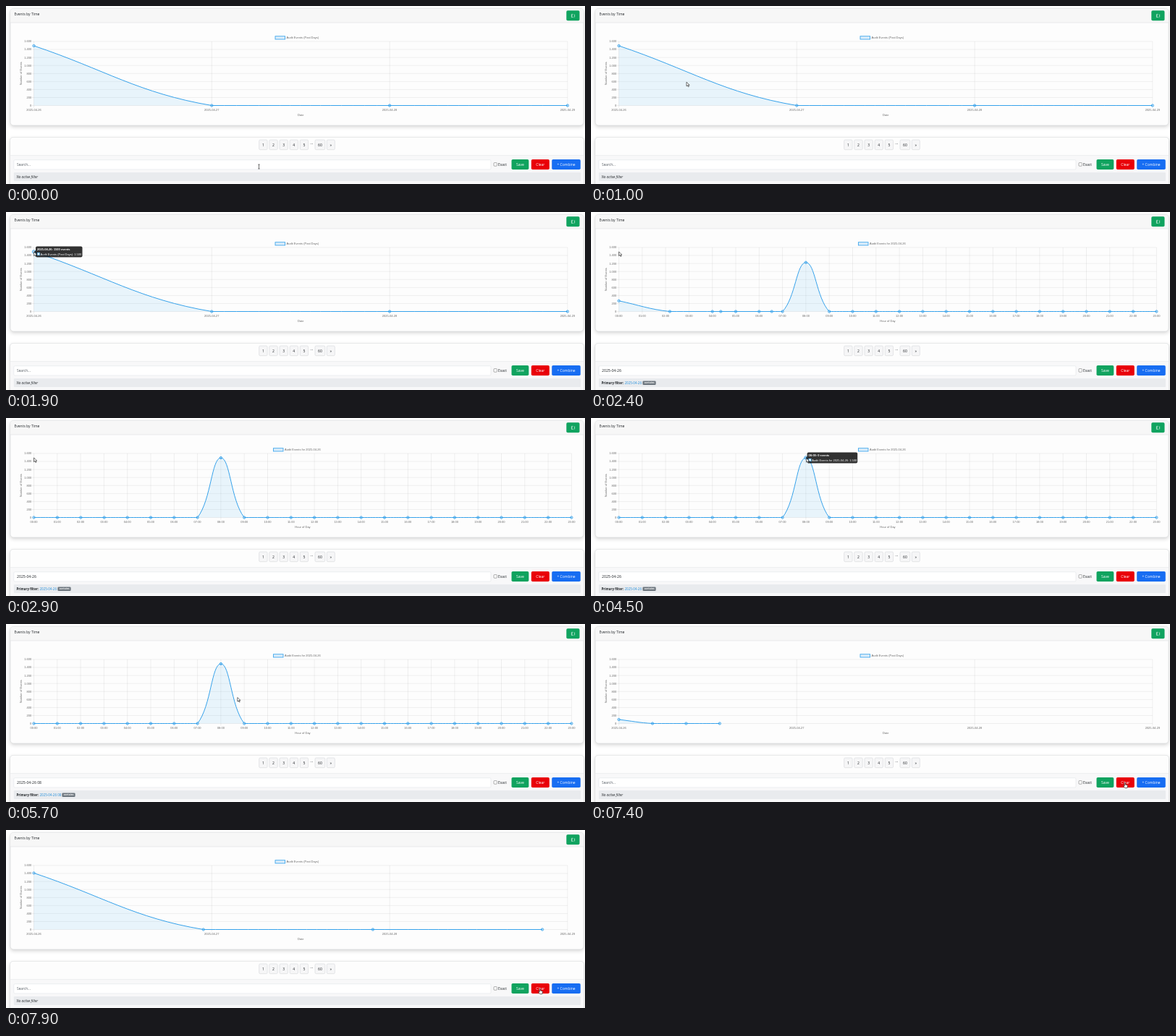
Write an HTML page that moves like this. It is 800x246 px and loops after 8000 ms.

```html
<!DOCTYPE html>
<html lang="en">
<head>
<meta charset="utf-8">
<title>Events by Time</title>
<style>
  html, body { margin: 0; width: 100%; height: 100%; overflow: hidden; background: #fff; }
  svg { display: block; width: 800px; height: 246px; }
  text { font: 5px "Open Sans", "Noto Sans", sans-serif; fill: #212529; white-space: pre; }
  .chart text { font: 4px "Liberation Sans", Arial, sans-serif; fill: #666; }
  .chart .tip text { fill: #fff; }
  .chart .tip .title { font-weight: bold; }
  .mid { text-anchor: middle; }
  .end { text-anchor: end; }
  .white { fill: #fff; }
  .card { fill: #fdfdfd; stroke: #d6d7d8; stroke-width: .6; filter: drop-shadow(0 2px 2.5px rgba(0, 0, 0, .16)); }
  .grid { stroke: rgba(0, 0, 0, .11); stroke-width: .55; fill: none; }
  .line { fill: none; stroke: #36a2eb; stroke-width: 1; stroke-linejoin: round; }
  .area { fill: rgba(54, 162, 235, .1); }
  .dot, .key { fill: rgba(54, 162, 235, .16); stroke: #36a2eb; stroke-width: .85; }
  .page { fill: #f6f6f7; stroke: #d5d7da; stroke-width: .6; }
  .cursor { fill: #fff; stroke: #111; stroke-width: .6; stroke-linejoin: round; }
</style>
</head>
<body>
<svg viewBox="0 0 800 246">
  <rect class="card" x="6" y="3.5" width="792" height="161.5" rx="4.5"/>
  <path d="M6.3 22.8V8a4.2 4.2 0 0 1 4.2-4.2h783a4.2 4.2 0 0 1 4.2 4.2v14.8z" fill="#f7f7f7"/>
  <path d="M6 23h792" stroke="#dcdddf" stroke-width=".6"/>
  <text x="11.5" y="13">Events by Time</text>
  <rect x="774.3" y="6.3" width="18.2" height="14" rx="1.8" fill="#10a35f"/>
  <path d="M783.6 11.5h-2.2v4h2.2M781.4 13.5h1.5M785.6 11.5v3.2q0 .8-.9.8" fill="none" stroke="#fff" stroke-width=".6"/>

  <g class="chart">
    <g id="yAxis"></g>
    <g id="dayAxis"></g>
    <g id="hourAxis"></g>
    <path id="area" class="area"/>
    <path id="line" class="line"/>
    <g id="dots"></g>
    <g id="dayTip" class="tip"></g>
    <g id="hourTip" class="tip"></g>
  </g>

  <rect class="card" x="5.5" y="181.3" width="793" height="80" rx="4.5"/>
  <rect x="5.8" y="206.5" width="792.4" height="40" fill="#f8f8f9"/>
  <path d="M5.8 206.5h792.4" stroke="#e6e7e9" stroke-width=".6"/>
  <g id="pages"></g>

  <rect x="10.8" y="212.7" width="659.2" height="13.2" rx="1.6" fill="#fff" stroke="#e1e4e7" stroke-width=".6"/>
  <text id="query" x="15" y="221.2"></text>
  <rect x="674" y="216.6" width="4.4" height="4.6" rx=".8" fill="#fff" stroke="#777" stroke-width=".6"/>
  <text x="680" y="221.1" style="font-size:4.85px">Exact</text>
  <g id="actions"></g>

  <rect x="10.8" y="230" width="783.2" height="12" rx="1.2" fill="#e9ebee"/>
  <text id="empty" x="14.5" y="237.6" style="font-size:4.65px;font-style:italic">No active filter</text>
  <g id="filter">
    <text x="14.5" y="237.6" style="font-size:4.35px;font-weight:bold">Primary filter:</text>
    <text id="term" x="46.5" y="237.6" style="font-size:4.5px;fill:#2490dd"></text>
    <g id="badge">
      <rect x="0" y="233.4" width="18.2" height="5.6" rx="1.3" fill="#6c757d"/>
      <text class="mid white" x="9.1" y="237.3" style="font-size:3.3px;font-weight:bold">contains</text>
    </g>
  </g>

  <g id="cursor" class="cursor">
    <path id="arrow" d="M0 0v5.6l1.4-1.2 1 2.1 1-.45-1-2h1.8z"/>
    <path id="beam" d="M-1.1-3h2.2M0-3v6M-1.1 3h2.2"/>
    <path id="hand" d="M-.6.4q.6-.7 1.2 0v2.3l2.3.6q.8.3.7 1.2l-.5 2.8h-3.2l-2-2.6q-.2-.9.7-.8l.8.6z"/>
  </g>
</svg>
<script>
const LOOP = 8000, STEP = 100;
const LEFT = 38.5, TOP = 49, BASE = 137.5, PEAK = 55;
const DAY_GAP = 245.8, HOUR_GAP = 32.3;
const DRILL = 2050, PICK = 5000, CLEAR = 7383;
const $ = id => document.getElementById(id);

function add(parent, tag, attrs, content) {
  const el = document.createElementNS("http://www.w3.org/2000/svg", tag);
  for (const k in attrs) el.setAttribute(k, attrs[k]);
  if (content) el.textContent = content;
  parent.appendChild(el);
  return el;
}
const label = (g, x, y, s, cls = "mid") => add(g, "text", { x, y, class: cls }, s);

function buildAxis(g, names, gap, title, legend, keyX) {
  const right = LEFT + gap * (names.length - 1);
  names.forEach((name, i) => {
    const x = LEFT + gap * i;
    add(g, "path", { class: "grid", d: `M${x} ${TOP}V${BASE + 3}` });
    label(g, x, 144.8, name);
  });
  for (let i = 0; i <= 8; i++)
    add(g, "path", { class: "grid", d: `M${LEFT - 3} ${BASE - i * (BASE - TOP) / 8}H${right}` });
  label(g, (LEFT + right) / 2, 152, title);
  add(g, "rect", { class: "key", x: keyX, y: 41.8, width: 13.6, height: 4.2 });
  label(g, keyX + 15.6, 45.3, legend, "");
}

function buildTip(g, x, width, title, body) {
  add(g, "path", { d: `M${x - 2} 55l2-2v4z`, fill: "rgba(0,0,0,.8)" });
  add(g, "rect", { x, y: 47.4, width, height: 15, rx: 2, fill: "rgba(0,0,0,.8)" });
  label(g, x + 2, 52.8, title, "title");
  add(g, "rect", { x: x + 2.2, y: 56.2, width: 3.4, height: 3.6, fill: "#e6f3fc", stroke: "#36a2eb", "stroke-width": .6 });
  label(g, x + 6.6, 59.5, body, "");
}

function buildStatic() {
  for (let i = 0; i <= 8; i++) {
    const n = i * 200;
    const s = n < 1000 ? `${n}` : `1.${String(n - 1000).padStart(3, "0")}`;
    label($("yAxis"), 35.3, BASE - i * (BASE - TOP) / 8 + 1.4, s, "end");
  }
  add($("yAxis"), "text", { class: "mid", transform: "translate(22 93.3) rotate(-90)" }, "Number of Events");

  const days = [26, 27, 28, 29].map(d => `2025-04-${d}`);
  const hours = Array.from({ length: 24 }, (_, h) => String(h).padStart(2, "0") + ":00");
  buildAxis($("dayAxis"), days, DAY_GAP, "Date", "Audit Events (Past Days)", 372);
  buildAxis($("hourAxis"), hours, HOUR_GAP, "Hour of Day", "Audit Events for 2025-04-26", 369.4);
  buildTip($("dayTip"), 41, 64.5, "2025-04-26: 1500 events", "Audit Events (Past Days): 1.500");
  buildTip($("hourTip"), 298.6, 69.6, "08:00: 0 events", "Audit Events for 2025-04-26: 1.500");

  const pages = [["1", 349.7, 11.4], ["2", 363.8, 11.4], ["3", 378, 11.4], ["4", 392.1, 11.4],
    ["5", 406.2, 11.4], ["60", 427, 13.8], ["»", 443.3, 11]];
  for (const [s, x, width] of pages) {
    add($("pages"), "rect", { class: "page", x, y: 185, width, height: 13.6, rx: 1.6 });
    label($("pages"), x + width / 2, 193.7, s);
  }
  label($("pages"), 422.2, 191, "…");

  const actions = [["Save", 698.5, 23.8, "#10a35f"], ["Clear", 725.8, 25, "#e90008"], ["+ Combine", 754.2, 39.6, "#176df2"]];
  for (const [s, x, width, fill] of actions) {
    add($("actions"), "rect", { x, y: 212, width, height: 14, rx: 1.8, fill });
    label($("actions"), x + width / 2, 221.1, s, "mid white");
  }
  for (let i = 0; i < 24; i++) add($("dots"), "circle", { class: "dot", r: 1.65 });
}

const clamp = (v, lo, hi) => Math.min(hi, Math.max(lo, v));
const quart = v => 1 - (1 - clamp(v, 0, 1)) ** 4;
const mix = (a, b, p) => a + (b - a) * p;
const dayPoint = i => [LEFT + DAY_GAP * i, i ? BASE : PEAK];
const hourPoint = i => [LEFT + HOUR_GAP * i, i === 8 ? PEAK : BASE];

function pointsAt(t, hourly) {
  const p = t < DRILL ? 1 : quart((t - (hourly ? DRILL : CLEAR)) / 1000);
  return Array.from({ length: hourly ? 24 : 4 }, (_, i) => {
    const to = hourly ? hourPoint(i) : dayPoint(i);
    const from = !hourly ? hourPoint(i) : i < 4 ? dayPoint(i) : [to[0], BASE];
    return [mix(from[0], to[0], p), mix(from[1], to[1], p)];
  });
}

// Cardinal spline whose handles stay inside the plot area.
function curve(pts, right) {
  const dist = (a, b) => Math.hypot(a[0] - b[0], a[1] - b[1]);
  const handles = pts.map((c, i) => {
    const a = pts[i - 1] || c, b = pts[i + 1] || c;
    const d1 = dist(a, c), d2 = dist(c, b), k = .4 / (d1 + d2 || 1);
    const at = f => [clamp(c[0] + f * (b[0] - a[0]), LEFT, right), clamp(c[1] + f * (b[1] - a[1]), TOP, BASE)];
    return [at(-k * d1), at(k * d2)];
  });
  return pts.reduce((d, c, i) => d + (i ? `C${handles[i - 1][1]} ${handles[i][0]} ${c}` : `M${c}`), "");
}

const path = [[0, 349.5, 222], [300, 349.5, 222], [1400, 38.5, 55], [2900, 38.5, 55], [3900, 297.5, 55.5],
  [5100, 297.5, 55.5], [5500, 319.8, 101.5], [5900, 319.8, 101.5], [7000, 737.8, 219.3], [LOOP, 737.8, 219.3]];

function cursorAt(t) {
  const i = path.findIndex(k => k[0] > t);
  const a = path[i - 1], b = path[i];
  const v = (t - a[0]) / (b[0] - a[0]), p = v * v * (3 - 2 * v);
  return [mix(a[1], b[1], p), mix(a[2], b[2], p)];
}

const show = (el, on) => el.setAttribute("display", on ? "inline" : "none");
const fade = (t, from, to) => t < to ? quart((t - from) / 400) : 1 - quart((t - to) / 400);

function drawChart(t, hourly) {
  const pts = pointsAt(t, hourly);
  const d = curve(pts, LEFT + (hourly ? HOUR_GAP * 23 : DAY_GAP * 3));
  const hot = t >= 1400 && t < DRILL ? 0 : t >= 3900 && t < 5200 ? 8 : -1;
  $("line").setAttribute("d", d);
  $("area").setAttribute("d", `${d}L${pts[pts.length - 1][0]} ${BASE}L${pts[0][0]} ${BASE}Z`);
  [...$("dots").children].forEach((dot, i) => {
    show(dot, i < pts.length);
    if (i >= pts.length) return;
    dot.setAttribute("cx", pts[i][0]);
    dot.setAttribute("cy", pts[i][1]);
    dot.setAttribute("r", i === hot ? 2.2 : 1.65);
  });
  show($("dayAxis"), !hourly);
  show($("hourAxis"), hourly);
  $("dayTip").setAttribute("opacity", fade(t, 1400, DRILL));
  $("hourTip").setAttribute("opacity", fade(t, 3900, 5200));
}

function drawFilter(t, active) {
  const term = t < PICK ? "2025-04-26" : "2025-04-26 08";
  $("query").textContent = active ? term : "Search...";
  $("query").style.fontSize = active ? "5.15px" : "4.8px";
  $("query").style.fill = active ? "#212529" : "#555c63";
  $("term").textContent = term;
  $("badge").setAttribute("transform", `translate(${t < PICK ? 71.4 : 77.4})`);
  show($("filter"), active);
  show($("empty"), !active);
}

function drawCursor(t) {
  const [x, y] = cursorAt(t);
  const inRow = y > 212 && y < 226;
  const beam = inRow && x < 670;
  const hand = inRow && (x > 698 && x < 722 || x > 726 && x < 751);
  $("cursor").setAttribute("transform", `translate(${x} ${y})`);
  show($("beam"), beam);
  show($("hand"), hand);
  show($("arrow"), !beam && !hand);
}

function draw(now) {
  const t = Math.floor((now % LOOP) / STEP) * STEP;
  const hourly = t >= DRILL && t < CLEAR;
  drawChart(t, hourly);
  drawFilter(t, hourly);
  drawCursor(t);
}

buildStatic();
const start = performance.now();
function tick() {
  draw(performance.now() - start);
  requestAnimationFrame(tick);
}
tick();
</script>
</body>
</html>
```
